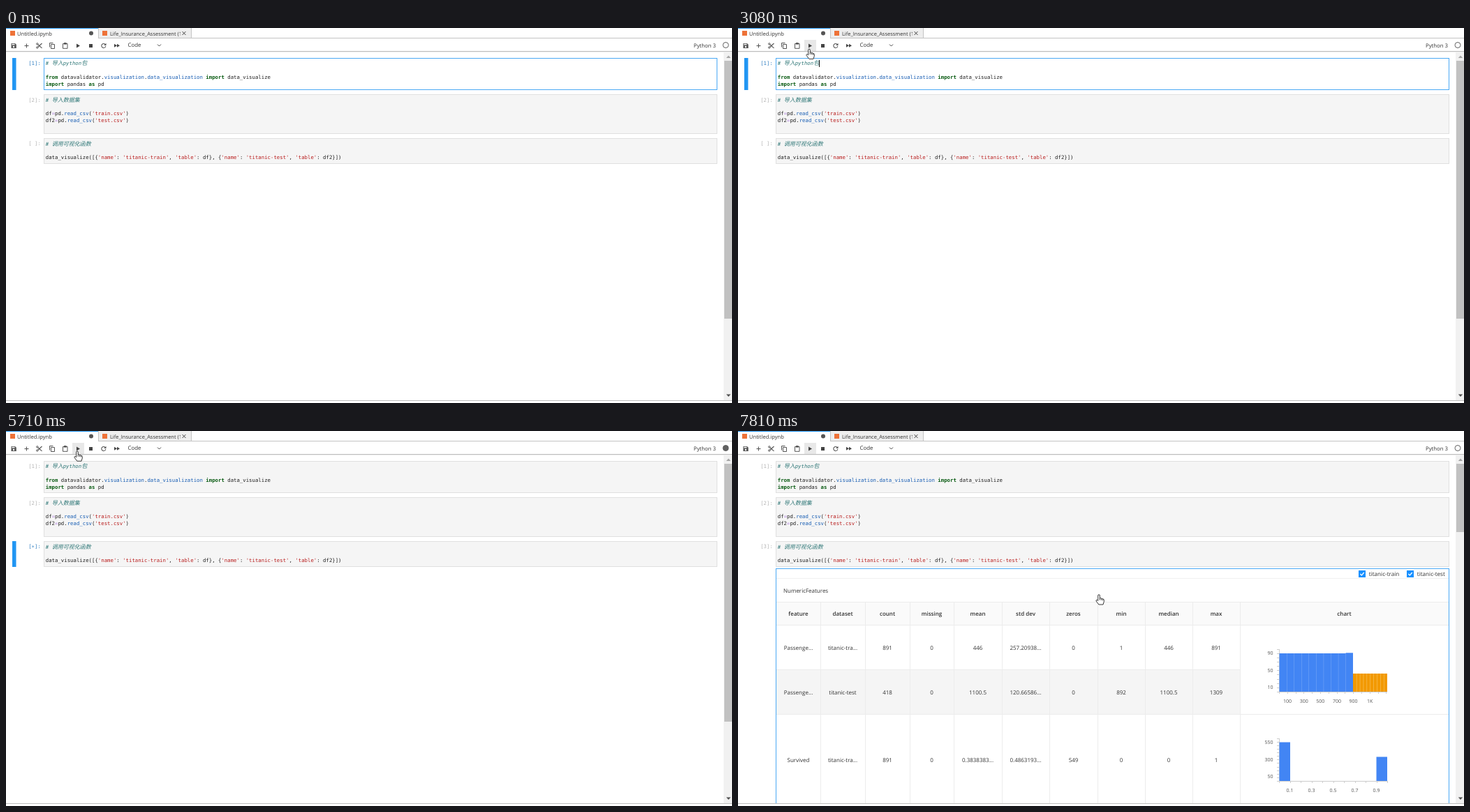
Write an HTML page with a canvas that moves like this. It is 1040 by 538 pixels and loops after 8 s.

```html
<!DOCTYPE html>
<html lang="en">
<head>
<meta charset="utf-8">
<title>Notebook run</title>
<style>
html, body { margin: 0; width: 100%; height: 100%; overflow: hidden; background: #fff; }
canvas { display: block; }
</style>
</head>
<body>
<canvas id="stage" width="1040" height="538"></canvas>
<script>
const ctx = document.getElementById('stage').getContext('2d');
const LOOP = 8000, CHAR = 4.414, BLUE = '#2196f3', FOCUS = '#4ba9f5', ICON = '#555';
const SANS = '"Open Sans", "Noto Sans", sans-serif';
const MONO = '"DejaVu Sans Mono", monospace';
const CJK = '"Noto Sans CJK SC", "Noto Sans CJK JP", "Noto Sans CJK", sans-serif';

// Token styles: colour, font
const STYLES = {
  n: ['#222', `7.33px ${MONO}`],
  k: ['#0b5c14', `bold 7.33px ${MONO}`],
  p: ['#1a5fb4', `7.33px ${MONO}`],
  s: ['#ba2121', `7.33px ${MONO}`],
  o: ['#b58be0', `7.33px ${MONO}`],
  c: ['#307878', `italic 7.33px ${MONO}`],
  z: ['#307878', `italic 8.02px ${CJK}`]
};
const CELLS = [
  { y: 43, h: 46, lines: [
    [0, 'c', '# ', 'z', '导入', 'c', 'python', 'z', '包'],
    [2, 'k', 'from', 'n', ' datavalidator.', 'p', 'visualization', 'n', '.', 'p', 'data_visualization', 'k', ' import', 'n', ' data_visualize'],
    [3, 'k', 'import', 'n', ' pandas ', 'k', 'as', 'n', ' pd']] },
  { y: 95.6, h: 57, lines: [
    [0, 'c', '# ', 'z', '导入数据集'],
    [2, 'n', 'df', 'o', '=', 'n', 'pd.', 'p', 'read_csv', 'n', '(', 's', "'train.csv'", 'n', ')'],
    [3, 'n', 'df2', 'o', '=', 'n', 'pd.', 'p', 'read_csv', 'n', '(', 's', "'test.csv'", 'n', ')']] },
  { y: 158.4, h: 37, lines: [
    [0, 'c', '# ', 'z', '调用可视化函数'],
    [2, 'n', 'data_visualize([{', 's', "'name'", 'n', ': ', 's', "'titanic-train'", 'n', ', ', 's', "'table'", 'n', ': df}, {',
      's', "'name'", 'n', ': ', 's', "'titanic-test'", 'n', ', ', 's', "'table'", 'n', ': df2}])']] }
];
const EDGES = [55, 118, 182, 246, 309, 378, 446, 515, 583, 651, 719, 1018];
const ROWS = [
  [262, 'feature', 'dataset', 'count', 'missing', 'mean', 'std dev', 'zeros', 'min', 'median', 'max', 'chart'],
  [311, 'Passenge...', 'titanic-tra...', '891', '0', '446', '257.20938...', '0', '1', '446', '891'],
  [375, 'Passenge...', 'titanic-test', '418', '0', '1100.5', '120.66586...', '0', '892', '1100.5', '1309'],
  [472, 'Survived', 'titanic-tra...', '891', '0', '0.3838383...', '0.4863193...', '549', '0', '0', '1']
];
// Pointer path: time, x, y
const PATH = [
  [210, 924, 520], [980, 71, 46], [1060, 74, 46], [1370, 131, 52.5], [1600, 131, 52.5],
  [1690, 122, 56], [1980, 102, 31], [2920, 102, 31], [3390, 102, 29.2], [6565, 102, 29.2],
  [6718, 143, 62.5], [6860, 143, 62.5], [6874, 144, 63.5], [6960, 144, 63.5], [7030, 205, 105],
  [7185, 288.5, 149.5], [7495, 430, 215], [7805, 517, 235]
];

function rect(x, y, w, h, color) {
  ctx.fillStyle = color;
  ctx.fillRect(x, y, w, h);
}
function box(x, y, w, h, fill, stroke) {
  rect(x, y, w, h, fill);
  ctx.strokeStyle = stroke;
  ctx.lineWidth = 1;
  ctx.strokeRect(x + .5, y + .5, w - 1, h - 1);
}
function text(str, x, y, size, color = '#333', align = 'left', weight = 400) {
  ctx.font = `${weight} ${size}px ${SANS}`;
  ctx.fillStyle = color;
  ctx.textAlign = align;
  ctx.fillText(str, x, y);
}
function path(d, { fill, stroke, width = 1, x = 0, y = 0 }) {
  ctx.save();
  ctx.translate(x, y);
  const shape = new Path2D(d);
  if (fill) { ctx.fillStyle = fill; ctx.fill(shape); }
  if (stroke) { ctx.strokeStyle = stroke; ctx.lineWidth = width; ctx.stroke(shape); }
  ctx.restore();
}
function disc(x, y, r, fill, stroke) {
  ctx.beginPath();
  ctx.arc(x, y, r, 0, 7);
  if (fill) { ctx.fillStyle = fill; ctx.fill(); }
  if (stroke) { ctx.strokeStyle = stroke; ctx.lineWidth = 1; ctx.stroke(); }
}

function drawTabs() {
  rect(132, 0, 133, 15, '#eee');
  rect(132, 14, 908, 1, '#c4c4c4');
  rect(132, 0, 1, 15, '#c4c4c4');
  rect(265, 0, 1, 15, '#c4c4c4');
  rect(0, 0, 132, 1, BLUE);
  rect(6, 4, 7, 7, '#ee7238');
  rect(138, 4, 7, 7, '#ee7238');
  text('Untitled.ipynb', 16, 10.5, 7.6);
  disc(122, 7.5, 3, '#555');
  ctx.save();
  ctx.beginPath();
  ctx.rect(148, 0, 102, 14);
  ctx.clip();
  text('Life_Insurance_Assessment (1)', 149, 10.5, 7.45);
  ctx.restore();
  path('M252.500 5 l5 5 m0 -5 l-5 5', { stroke: '#444' });
}

function drawToolbar(runFocused, busy) {
  if (runFocused) rect(95, 17, 17, 16, '#e8e8e8');
  rect(0, 33, 1040, 1, '#bdbdbd');
  rect(0, 34, 1040, 1, '#f0f0f0');
  path('M7.500 22 h5.500 l1.800 1.800 v5.200 h-7.300z', { fill: ICON });
  rect(8.5, 22.8, 4, 1.6, '#fff');
  disc(11, 27, 1.2, '#fff');
  path('M26.500 25.500 h6 M29.500 22.500 v6', { stroke: ICON });
  path('M45 23 L51.500 28.800 M45 28 L51.500 22', { stroke: ICON, width: 1.1 });
  disc(44.8, 22.8, 1.2, '#fff', ICON);
  disc(44.8, 28, 1.2, '#fff', ICON);
  path('M62.500 27.500 v-6 h5 M64.500 23.500 h5 v6 h-5z', { stroke: ICON });
  path('M81.500 22.500 h6.500 v6.800 h-6.500z', { stroke: ICON });
  rect(83, 21, 3.6, 2.6, ICON);
  path('M101 22.400 v6 l5 -3z', { fill: '#444' });
  rect(119, 23, 5, 5, '#444');
  path('M142.200 23.600 a3 3 0 1 0 .6 2.400', { stroke: ICON, width: 1.1 });
  path('M143.500 21.800 v3.200 h-3.200z', { fill: ICON });
  path('M155 22.800 v5 l4 -2.500z M159 22.800 v5 l4 -2.500z', { fill: '#444' });
  text('Code', 174.5, 27, 7.9);
  path('M217 23.500 l2.500 2.500 l2.500 -2.500', { stroke: '#444' });
  text('Python 3', 985, 27.8, 7.75);
  disc(1031, 24.5, 4, busy ? '#616161' : null, '#616161');
}

function drawCell({ y, h, lines }, prompt, selected, editing) {
  const top = Math.floor(y);
  box(54, top, 965, h, editing ? '#fff' : '#f5f5f5', editing ? FOCUS : '#e0e0e0');
  if (selected) rect(9, top, 5.5, h, BLUE);
  ctx.textAlign = 'left';
  ctx.font = `7.33px ${MONO}`;
  ctx.fillStyle = selected ? '#307fc1' : '#b4b4b4';
  ctx.fillText(`[${prompt}]:`, 32.2, y + 10);
  for (const [row, ...tokens] of lines) {
    let x = 56.8;
    for (let i = 0; i < tokens.length; i += 2) {
      const [color, font] = STYLES[tokens[i]], str = tokens[i + 1];
      ctx.fillStyle = color;
      ctx.font = font;
      ctx.fillText(str, x, y + 10.1 + row * 9.87);
      x += str.length * (tokens[i] === 'z' ? 8.02 : CHAR);
    }
  }
}

function drawTable() {
  box(54, 197, 965, 400, '#fff', FOCUS);
  rect(55, 211, 963, 1, '#f0f0f0');
  [[889, 'titanic-train'], [958, 'titanic-test']].forEach(([x, label]) => {
    rect(x, 200, 10, 10, '#1890ff');
    path('M2.300 5 l2 2 l3.500 -4', { stroke: '#fff', width: 1.2, x, y: 200 });
    text(label, x + 14.8, 208, 8.15);
  });
  text('NumericFeatures', 65, 231.5, 8);
  rect(55, 245, 963, 33, '#fafafa');
  rect(55, 342, 664, 64, '#f5f5f5');
  for (const y of [245, 278, 406]) rect(55, y, 963, 1, '#ececec');
  rect(55, 342, 664, 1, '#ececec');
  for (const x of EDGES.slice(1, -1)) rect(x, 245, 1, 300, '#ececec');
  ROWS.forEach(([y, ...cells], row) => cells.forEach((str, i) =>
    text(str, (EDGES[i] + EDGES[i + 1]) / 2, y + 3, 8, '#333', 'center', row ? 400 : 600)));
}

function drawAxes(base, xStep, xLabels, firstX, gapX, yStep, yLabels) {
  rect(775, base - 61, 1, 61, '#ccc');
  rect(775, base, 155, 1, '#ccc');
  for (let y = base; y > base - 62; y -= yStep) rect(772, Math.round(y), 3, 1, '#ccc');
  for (let x = 775; x < 931; x += xStep) rect(Math.round(x), base, 1, 3, '#ccc');
  xLabels.forEach((s, i) => text(s, firstX + i * gapX, base + 16, 7, '#555', 'center'));
  yLabels.forEach((s, i) => text(s, 766.5, base - 53 + i * 24.7, 7, '#555', 'right'));
}

function drawCharts() {
  drawAxes(374, 11.8, ['100', '300', '500', '700', '900', '1K'], 787, 23.65, 6.15, ['90', '50', '10']);
  rect(775.5, 319, 105.5, 55, '#4285f4');
  rect(870.5, 318.3, 10.5, 1, '#4285f4');
  rect(881, 348, 49, 26, '#f29900');
  for (let i = 1; i < 10; i++) {
    rect(775.5 + i * 10.55, 319, .3, 55, '#ffffff80');
    rect(881 + i * 4.9, 348, .5, 26, '#ffffff80');
  }
  drawAxes(502, 15.5, ['0.1', '0.3', '0.5', '0.7', '0.9'], 790.5, 31, 5.1, ['550', '300', '50']);
  rect(775.5, 446.5, 15.5, 55.5, '#4285f4');
  rect(914.5, 467.5, 15.5, 34.5, '#4285f4');
}

function drawScrollbar(thumbEnd) {
  rect(1028, 35, 12, 499, '#f1f1f1');
  rect(1029, 47, 11, thumbEnd - 47, '#c1c1c1');
  path('M1031.800 43 l3.200 -3.500 l3.200 3.500z', { fill: '#a3a3a3' });
  path('M1031.800 525.500 l3.200 3.500 l3.200 -3.500z', { fill: '#505050' });
}

function drawPointer(t) {
  // The pointer is sampled about 13 times a second.
  const q = 210 + 77.5 * Math.floor((t - 204) / 77.5);
  if (q < 210) return;
  let i = 0;
  while (i < PATH.length - 2 && q > PATH[i + 1][0]) i++;
  const [t0, x0, y0] = PATH[i], [t1, x1, y1] = PATH[i + 1];
  const k = Math.min(1, (q - t0) / (t1 - t0));
  const x = x0 + (x1 - x0) * k, y = y0 + (y1 - y0) * k;
  if (q > 1900) {
    path('M-1.300 8 V1 Q-1.300 -.2 0 -.2 Q1.300 -.2 1.300 1 V4.800 Q3.300 4 3.600 5.400 Q5.300 4.800 5.600 6.100 Q7.300 5.800 7.300 7.500 V9.700 L6 14 H-.2 L-3.900 9 Q-4.500 7.600 -3.200 7.300 Q-2.300 7.200 -1.300 8.500Z M1.300 5 V7.500 M3.600 5.500 V7.800 M5.600 6.300 V8.200',
      { fill: '#fff', stroke: '#222', width: .9, x, y });
  } else if (y > 195) {
    path('M0 0 V11 L2.600 8.700 L4.200 12.200 L5.800 11.500 L4.300 8.100 H7.800Z', { fill: '#fff', stroke: '#222', width: .8, x, y });
  } else {
    path('M-2.500 -5 H-.6 L0 -4.500 L.6 -5 H2.500 M0 -4.500 V4.500 M-2.500 5 H-.6 L0 4.500 L.6 5 H2.500', { stroke: '#222', x, y });
  }
}

function draw(t) {
  const within = (from, to) => t >= from && t < to;
  const selected = t < 3540 ? 0 : t < 4460 ? 1 : t < 5940 ? 2 : -1;
  const finished = t >= 7490;
  const prompts = [
    within(3540, 4150) ? '∗' : '1',
    '2',
    t < 5620 ? ' ' : finished ? '3' : '∗'
  ];
  rect(0, 0, 1040, 538, '#fff');
  drawTabs();
  drawToolbar(t >= 1910, within(3540, 4150) || within(5620, 7490));
  ctx.save();
  ctx.beginPath();
  ctx.rect(0, 35, 1040, 499);
  ctx.clip();
  CELLS.forEach((cell, i) => drawCell(cell, prompts[i], i === selected, i === 0 && t < 3540));
  if (within(1700, 2230) || within(2690, 3220)) rect(116, 46, 1, 10, '#111');
  if (t >= 5940) drawTable();
  if (finished) drawCharts();
  drawScrollbar(t < 5785 ? 417 : 145);
  ctx.restore();
  rect(0, 534, 1040, 1, '#bdbdbd');
  drawPointer(t);
}

ctx.textRendering = 'geometricPrecision';
const start = performance.now();
function tick() {
  draw((performance.now() - start) % LOOP);
  requestAnimationFrame(tick);
}
tick();
</script>
</body>
</html>
```
